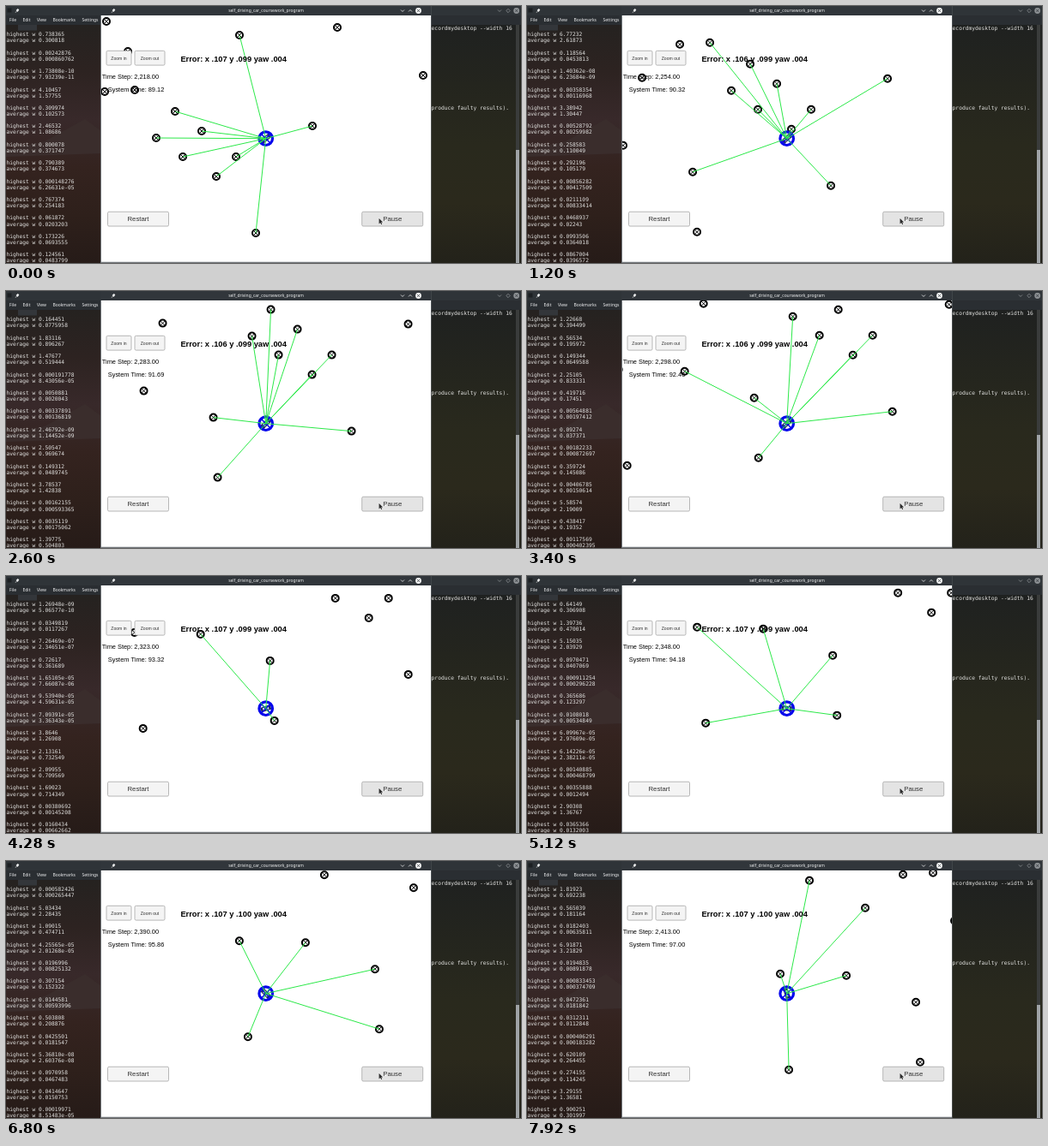
An HTML page with a canvas for the animation above (8 s loop, 600 px wide and 300 px high).

```html
<!DOCTYPE html>
<html lang="en">
<head>
<meta charset="utf-8">
<title>Particle filter simulator</title>
<style>
  html, body { margin: 0; width: 100%; height: 100%; overflow: hidden; background: #1b1715; }
  canvas { display: block; width: 600px; height: 300px; }
</style>
</head>
<body>
<canvas id="stage" width="600" height="300"></canvas>
<script>
const ctx = document.getElementById('stage').getContext('2d');
const LOOP = 8000, TICKS = 120, FIRST_STEP = 2218;
const CAR = { x: 302.7, y: 154.7 }, SENSOR_RANGE = 144;
const SANS = '"Liberation Sans", Arial, sans-serif';
const UI = '"Noto Sans", sans-serif';
const MONO = '6.25px "DejaVu Sans Mono", monospace';
const LIGHT = '#eff0f1', DIM = '#8d9194', BAR = '#31363b';

// simulator pace: tick, steps done, system time
const PACE = [
  [0, 0, 89.12], [18, 36, 90.32], [27, 49, 90.92], [51, 80, 92.46],
  [77, 130, 94.18], [102, 172, 95.86], [119, 195, 97]
];

// landmark map, in stage pixels at the first step
const LANDMARKS = [
  [117, 18], [142, 53], [272, 34], [386, 25], [486, 81], [115, 100], [150, 98], [197, 123],
  [228, 146], [175, 154], [206, 176], [268, 176], [245, 199], [357, 140], [291, 265],
  [71, 139], [130, 249], [135, 319], [49, 218], [-18, 328], [-28, 216], [6, 107]
];

const mix = (a, b, u) => a + (b - a) * u;
const ramp = (value, from) => Math.max(0, value - from);
const noise = n => { const v = Math.sin(n * 12.9898) * 43758.5453; return v - Math.floor(v); };

function smoothstep(from, to, value) {
  const u = Math.min(1, Math.max(0, (value - from) / (to - from)));
  return u * u * (3 - 2 * u);
}

// the map slides on nearly straight, then bends with the curve and slows down
const heading = s => (-40 - .07 * s + 1.01 * ramp(s, 77) + .18 * ramp(s, 160)) * Math.PI / 180;
const speed = s => mix(2.33, 1.97, smoothstep(45, 105, s));

const ROUTE = [[0, 0]];
for (let s = .5; s < 200; s++) {
  const [x, y] = ROUTE.at(-1);
  ROUTE.push([x + speed(s) * Math.cos(heading(s)), y + speed(s) * Math.sin(heading(s))]);
}

function paceAt(tick) {
  const next = Math.max(1, PACE.findIndex(key => key[0] >= tick));
  const a = PACE[next - 1], b = PACE[next], u = (tick - a[0]) / (b[0] - a[0]);
  return { step: Math.round(mix(a[1], b[1], u)), clock: mix(a[2], b[2], u) };
}

function printed(value) {
  return value < 1e-4
    ? value.toExponential(5).replace(/-(\d)$/, '-0$1')
    : String(Number(value.toPrecision(6)));
}

function text(string, x, y, font, color = '#000', align = 'left') {
  ctx.font = font;
  ctx.fillStyle = color;
  ctx.textAlign = align;
  ctx.fillText(string, x, y);
}

function rect(x, y, w, h, fill) {
  ctx.fillStyle = fill;
  ctx.fillRect(x, y, w, h);
}

function trace(points) {
  ctx.beginPath();
  points.forEach(([x, y]) => ctx.lineTo(x, y));
}

function line(points, color, width) {
  trace(points);
  ctx.strokeStyle = color;
  ctx.lineWidth = width;
  ctx.stroke();
}

function shape(points, color) {
  trace(points);
  ctx.fillStyle = color;
  ctx.fill();
}

function cross(x, y, d, color, width) {
  line([[x - d, y - d], [x + d, y + d]], color, width);
  line([[x + d, y - d], [x - d, y + d]], color, width);
}

function ring(x, y, radius, color, width) {
  ctx.beginPath();
  ctx.arc(x, y, radius, 0, Math.PI * 2);
  ctx.strokeStyle = color;
  ctx.lineWidth = width;
  ctx.stroke();
}

function fade(...colors) {
  const gradient = ctx.createLinearGradient(0, 22, 0, 300);
  colors.forEach((color, i) => gradient.addColorStop(i / (colors.length - 1), color));
  return gradient;
}

function button(x, y, w, label, size, fill = '#f4f4f4') {
  ctx.beginPath();
  ctx.roundRect(x, y, w, 16.8, 1.5);
  ctx.fillStyle = fill;
  ctx.fill();
  ctx.strokeStyle = '#a6a6a6';
  ctx.lineWidth = .8;
  ctx.stroke();
  text(label, x + w / 2, y + 8.4 + size * .36, `${size}px ${SANS}`, '#323232', 'center');
}

function chevron(x, y, dir, color) {
  line([[x - 2, y - dir], [x, y + dir], [x + 2, y - dir]], color, .8);
}

function closeIcon(x, y, color) {
  ctx.beginPath();
  ctx.arc(x, y, 3.4, 0, Math.PI * 2);
  ctx.fillStyle = color;
  ctx.fill();
  cross(x, y, 1.4, BAR, .8);
}

function pin(x, y, color) {
  line([[x - 2, y + 2.3], [x, y]], color, .7);
  shape([[x - 1.4, y - .6], [x + .8, y - 2.4], [x + 2.3, y - .9], [x + .6, y + 1.4]], color);
}

function drawDesktop() {
  rect(0, 0, 111, 300, fade('#252220', '#2d2321', '#38292a', '#34231f', '#2e201b', '#261b18'));
  shape([[0, 168], [45, 158], [92, 132], [111, 146], [111, 172], [0, 176]], '#3a2d2c');
  rect(495, 0, 105, 300, fade('#1f2120', '#24251e', '#29291d', '#2b291c', '#23221a'));
  rect(0, 0, 600, 11, '#2f3438');
  rect(0, 11, 600, 11, '#2a2e32');
  rect(14, 22, 22, 6.5, '#33363a');
  rect(1.5, 2.5, 5, 5, '#1d2023');
  pin(13, 5.5, LIGHT);
  let x = 4;
  for (const label of ['File', 'Edit', 'View', 'Bookmarks', 'Settings']) {
    text(label, x, 18.4, `5px ${UI}`, LIGHT);
    x += ctx.measureText(label).width + 7.5;
  }
  chevron(575, 5.5, 1, DIM);
  line([[585, 3.3], [587.2, 5.5], [585, 7.7], [582.8, 5.5], [585, 3.3]], DIM, .8);
  closeIcon(594.7, 5.5, DIM);
  rect(594, 22, 4, 278, '#3a3c3b');
  rect(594, 168, 4, 132, '#9fa3a6');
}

function drawTerminal(step) {
  const print = (string, x, row) => text(string, x, 28.1 + row * 7.14, MONO, '#e2e2e0');
  for (let i = 0; i < 13; i++) {
    const seed = FIRST_STEP + step + i;
    const highest = 8 * noise(seed) ** 6;
    const average = highest * mix(.32, .5, noise(seed + .13));
    print('highest w ' + printed(highest), .4, 3 * i + 1);
    print('average w ' + printed(average), .4, 3 * i + 2);
  }
  print('ecordmydesktop --width 16', 495.6, 0);
  print('produce faulty results).', 495.6, 13);
}

function drawCar(step) {
  ctx.save();
  ctx.translate(CAR.x, CAR.y);
  ctx.rotate(heading(step));
  rect(-6, -2.8, 12, 5.6, '#1d2c5e');
  rect(-3.5, -1.7, 2, 3.4, '#dfe6ee');
  rect(1.5, -1.7, 2, 3.4, '#dfe6ee');
  ctx.restore();
  ring(CAR.x, CAR.y, 7.8, '#0505ec', 3.2);
  cross(CAR.x, CAR.y, 5, '#0505ec', 1.5);
}

function drawMap(step) {
  const [dx, dy] = ROUTE[step];
  const marks = LANDMARKS.map(([x, y]) => [x + dx, y + dy]);
  for (const [x, y] of marks) {
    ring(x, y, 4, '#000', 2);
    cross(x, y, 2.6, '#000', 1);
  }
  drawCar(step);
  marks.filter(([x, y]) => Math.hypot(x - CAR.x, y - CAR.y) < SENSOR_RANGE)
    .forEach(mark => line([[CAR.x, CAR.y], mark], '#2ce949', 1));
}

function drawCursor(x, y) {
  const arrow = [[0, 0], [0, 6.6], [1.6, 5.3], [2.7, 7.5], [3.7, 7], [2.7, 4.8], [4.7, 4.7], [0, 0]]
    .map(([px, py]) => [x + px, y + py]);
  line(arrow, '#fff', .8);
  shape(arrow, '#2c2c2c');
}

function drawSimulator(tick, step, clock) {
  rect(110, 0, 385.5, 300, '#6f7478');
  rect(110, 0, 385.5, 11, BAR);
  pin(125, 5.5, LIGHT);
  text('self_driving_car_coursework_program', 303, 7.3, `4.95px ${UI}`, LIGHT, 'center');
  chevron(462, 5.5, 1, LIGHT);
  chevron(471, 5.5, -1, LIGHT);
  closeIcon(480.5, 5.5, '#f3f4f4');

  ctx.save();
  ctx.beginPath();
  ctx.rect(111, 11, 384, 287.7);
  ctx.clip();
  rect(111, 11, 384, 288, '#fff');
  drawMap(step);
  const errorX = tick < 9 || tick >= 64 ? '.107' : '.106';
  const errorY = tick < 90 ? '.099' : '.100';
  text(`Error: x ${errorX} y ${errorY} yaw .004`, 203.4, 65.2, `bold 9.3px ${SANS}`);
  text(`Time Step: ${(FIRST_STEP + step).toLocaleString('en-US')}.00`, 111.8, 85, `7.4px ${SANS}`);
  text(`System Time: ${clock.toFixed(2)}`, 118.8, 99.6, `7.4px ${SANS}`);
  button(117, 52.3, 29, 'Zoom in', 5.1);
  button(150, 52.3, 35, 'Zoom out', 5.1);
  button(118.5, 240.2, 71, 'Restart', 7.75);
  button(414.7, 240.2, 71, 'Pause', 7.75, '#e4e4e4');
  drawCursor(434.5, 247.8);
  ctx.restore();
}

// ticks fall on the nearest 40 ms slot
function draw() {
  const slot = Math.floor(performance.now() % LOOP / 40);
  const tick = Math.floor((slot + .5) * 40 * TICKS / LOOP);
  const { step, clock } = paceAt(tick);
  drawDesktop();
  drawTerminal(step);
  drawSimulator(tick, step, clock);
  requestAnimationFrame(draw);
}
draw();
</script>
</body>
</html>
```
